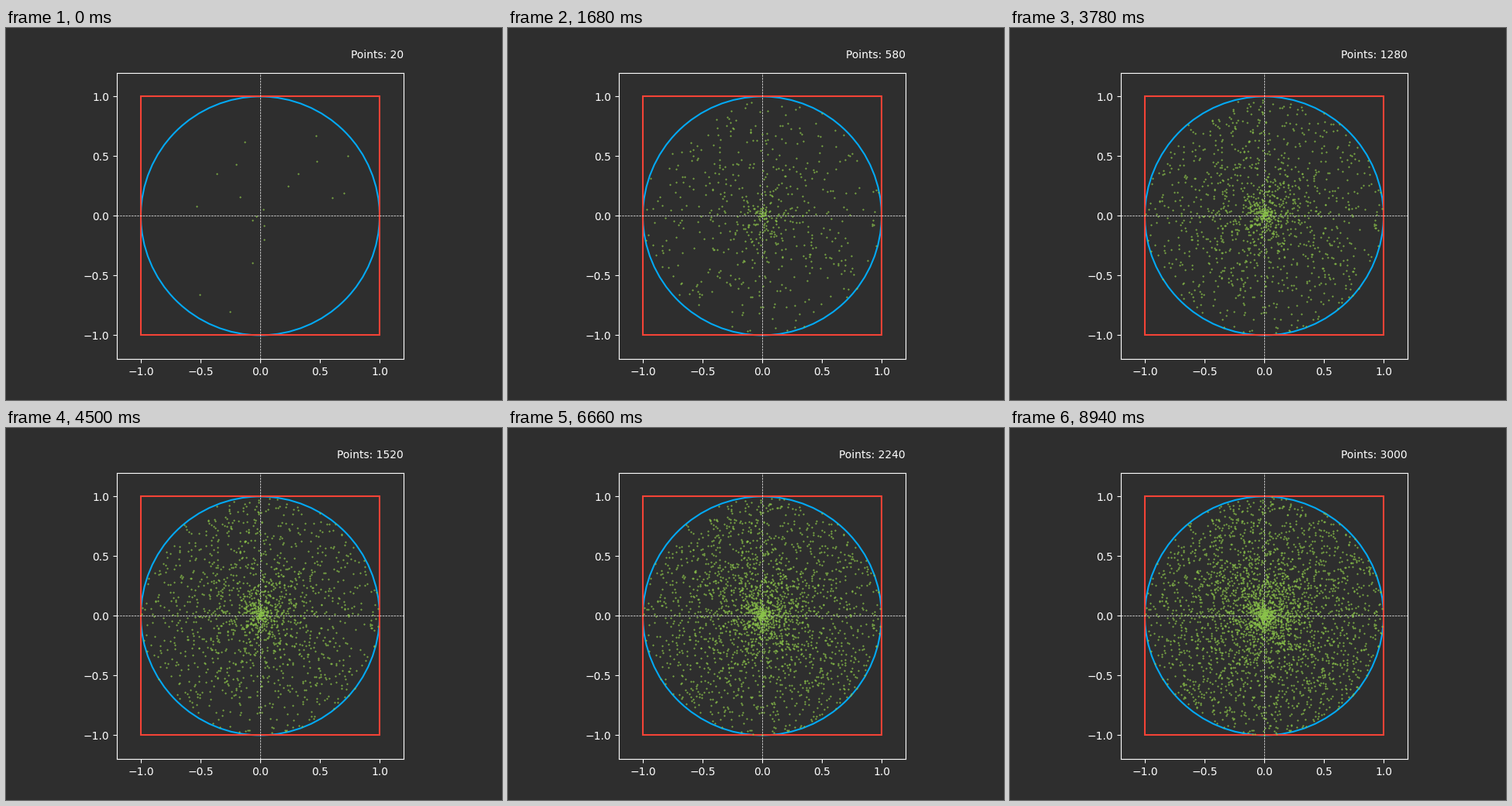
A matplotlib script that plays this animation: 640x480 px, repeating every 9000 ms.

```python
import numpy as np
import matplotlib.pyplot as plt
from matplotlib.animation import FuncAnimation
from matplotlib.patches import Circle, Rectangle

FRAMES = 150
STEP = 20          # points added per frame
INTERVAL = 60      # ms
BACK, BLUE, RED, GREEN = "#2e2e2e", "#03a9f4", "#f44336", "#8bc34a"

plt.rcParams["font.family"] = "DejaVu Sans"

# Opening batch, in unit-circle coordinates
START = np.array([
    (-.13, .62), (-.20, .43), (-.364, .351), (-.169, .156), (-.532, .078),
    (.468, .669), (.475, .455), (.734, .50), (.318, .351), (.234, .247),
    (.604, .149), (.702, .188), (.026, .052), (-.032, -.006), (-.065, -.039),
    (.032, -.084), (.032, -.201), (-.065, -.396), (-.506, -.662), (-.253, -.805),
])


def make_points():
    """Uniform radius and angle, so the points crowd around the centre."""
    rng = np.random.default_rng(7)
    n = FRAMES * STEP - len(START)
    radius = rng.uniform(0, 1, n)
    angle = rng.uniform(0, 2 * np.pi, n)
    rest = np.column_stack([radius * np.cos(angle), radius * np.sin(angle)])
    return np.vstack([START, rest])


points = make_points()

fig, ax = plt.subplots(figsize=(6.4, 4.8), dpi=100, facecolor=BACK)
ax.set_facecolor(BACK)
ax.set_aspect("equal")
ax.set_xlim(-1.2, 1.2)
ax.set_ylim(-1.2, 1.2)
ax.set_xticks(np.arange(-1, 1.1, 0.5))
ax.set_yticks(np.arange(-1, 1.1, 0.5))
ax.tick_params(colors="white")
for spine in ax.spines.values():
    spine.set_color("white")

ax.add_patch(Circle((0, 0), 1, fill=False, ec=BLUE, lw=1.5))
ax.add_patch(Rectangle((-1, -1), 2, 2, fill=False, ec=RED, lw=1.5))
ax.axhline(0, color="white", lw=0.5, ls="--")
ax.axvline(0, color="white", lw=0.5, ls="--")

dots, = ax.plot([], [], ".", color=GREEN, ms=1)
label = ax.text(1, 1.05, "", color="white", fontsize=10, ha="right",
                transform=ax.transAxes)


def update(frame):
    count = (frame + 1) * STEP
    dots.set_data(points[:count, 0], points[:count, 1])
    label.set_text(f"Points: {count}")
    return dots, label


anim = FuncAnimation(fig, update, frames=FRAMES, interval=INTERVAL,
                     init_func=lambda: update(0), repeat=True, repeat_delay=0)
plt.show()
```
